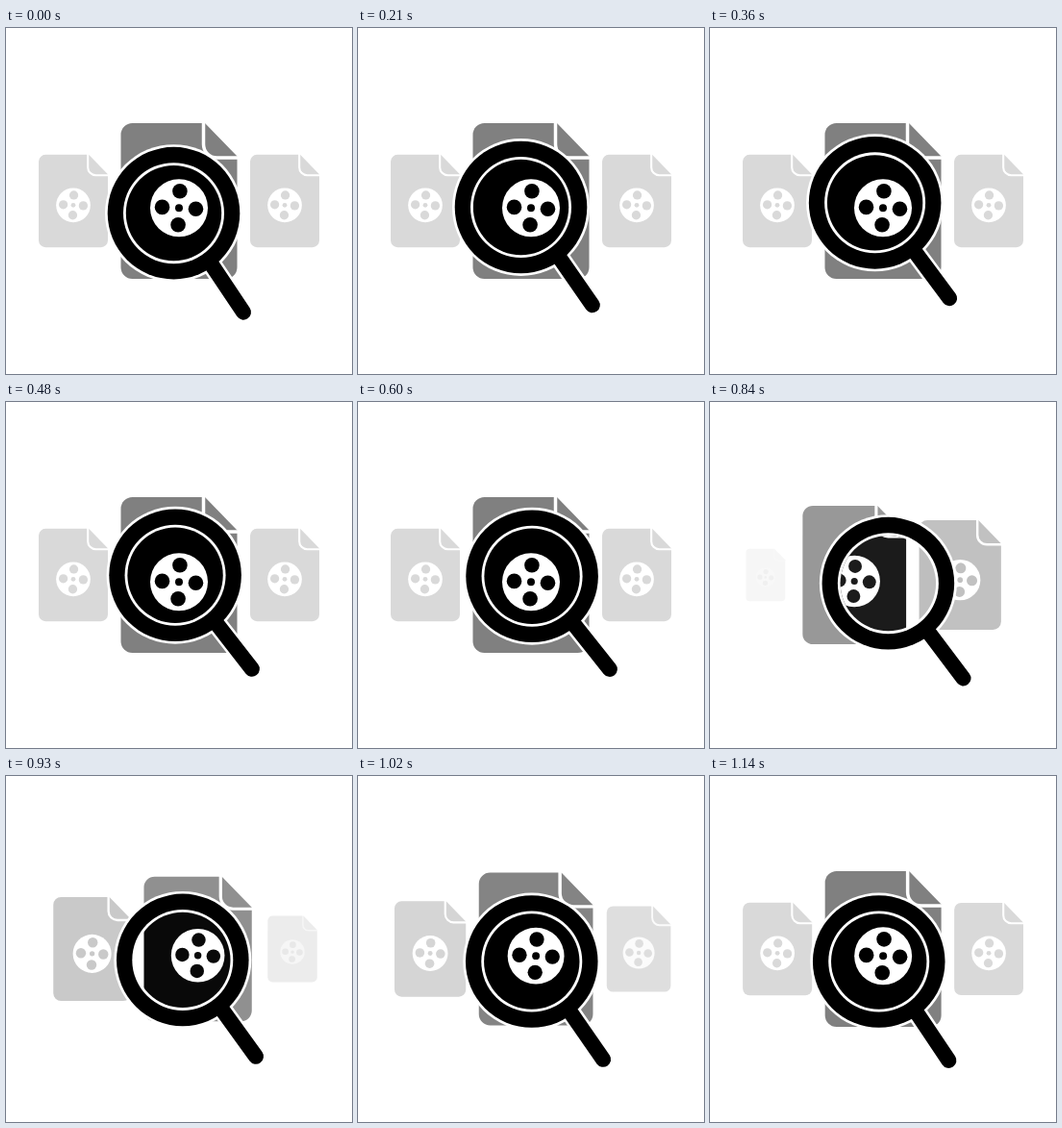
Animation of 360x360 px, one loop 1.17 s. Source, as an HTML page with a canvas:

```html
<!DOCTYPE html>
<html lang="en">
<head>
<meta charset="utf-8">
<title>File search</title>
<style>
  html, body { margin: 0; width: 100%; height: 100%; overflow: hidden; background: #fff; }
  canvas { display: block; width: 360px; height: 360px; }
</style>
</head>
<body>
<canvas id="stage" width="360" height="360"></canvas>
<script>
const ctx = document.getElementById('stage').getContext('2d');
const LOOP = 1170, STEP = 30, SLIDE_START = 600;
const TAU = Math.PI * 2, RAD = Math.PI / 180;

const page = new Path2D(
  'M-48.5-81H27L60.5-46.5V69A12 12 0 0 1 48.5 81H-48.5A12 12 0 0 1-60.5 69V-69A12 12 0 0 1-48.5-81Z');
const fold = new Path2D('M25.5-83V-59A14 14 0 0 0 39.5-45H63');

function disc(x, y, r, color) {
  ctx.fillStyle = color;
  ctx.beginPath();
  ctx.arc(x, y, r, 0, TAU);
  ctx.fill();
}

// Same curve as cubic-bezier(.78, 0, .15, 1)
function ease(u) {
  if (u <= 0) return 0;
  let lo = 0, hi = 1;
  for (let i = 0; i < 24; i++) {
    const s = (lo + hi) / 2, r = 1 - s;
    const x = 3 * s * r * r * 0.78 + 3 * s * s * r * 0.15 + s * s * s;
    if (x < u) lo = s; else hi = s;
  }
  return lo * lo * (3 - 2 * lo);
}

const smoother = d => d * d * d * (10 + d * (6 * d - 15));

// slot: 0 is the middle, -1 and 1 the sides; beyond that the file shrinks and fades
function drawFile(slot, inLens) {
  const dist = Math.min(Math.abs(slot), 1);
  const beyond = Math.abs(slot) - dist;
  const alpha = 1 - 2.8 * beyond;
  if (alpha <= 0) return;

  const scale = (1 - 0.405 * dist) * (1 - 1.6 * beyond);
  const level = Math.round(inLens ? 217 * smoother(dist) : 128 + 89 * dist);
  const color = `rgb(${level},${level},${level})`;

  ctx.save();
  ctx.globalAlpha = alpha;
  ctx.translate(180 + Math.sign(slot) * (110 * dist + 45 * beyond), 180);
  ctx.scale(scale, scale);
  ctx.fillStyle = color;
  ctx.fill(page);
  ctx.strokeStyle = '#fff';
  ctx.lineWidth = 3.5;
  ctx.stroke(fold);

  disc(0, 7.3, 30, '#fff');
  disc(0, 7.3, 4, color);
  for (let i = 0; i < 4; i++) {
    const a = (i * 90 + 3) * RAD;
    disc(17.5 * Math.cos(a), 7.3 + 17.5 * Math.sin(a), 7.8, color);
  }
  ctx.restore();
}

function drawFiles(shift, inLens) {
  for (let i = -1; i <= 2; i++) drawFile(i - shift, inLens);
}

function drawHandle(tilt, width, color) {
  const a = (tilt - 1.5) * RAD, b = tilt * RAD;
  ctx.strokeStyle = color;
  ctx.lineWidth = width;
  ctx.lineCap = 'round';
  ctx.beginPath();
  ctx.moveTo(60 * Math.cos(a), 60 * Math.sin(a));
  ctx.lineTo(126 * Math.cos(b), 126 * Math.sin(b));
  ctx.stroke();
}

function draw(t) {
  const turn = TAU * t / LOOP;
  const shift = ease((t - SLIDE_START) / (LOOP - SLIDE_START));
  const x = 177.5 + 8 * Math.cos(turn + 112 * RAD);
  const y = 186.8 + 6.6 * Math.sin(turn + 118 * RAD);
  const tilt = 52.5 + 2.4 * Math.cos(turn - TAU * 30 / LOOP);

  ctx.fillStyle = '#fff';
  ctx.fillRect(0, 0, 360, 360);
  drawFiles(shift, false);

  ctx.save();
  ctx.translate(x, y);
  drawHandle(tilt, 21, '#fff');
  disc(0, 0, 71.5, '#fff');
  drawHandle(tilt, 16, '#000');
  disc(0, 0, 68.8, '#000');
  disc(0, 0, 52.5, '#fff');
  ctx.restore();

  ctx.save();
  ctx.beginPath();
  ctx.arc(x, y, 49.7, 0, TAU);
  ctx.clip();
  drawFiles(shift, true);
  ctx.restore();
}

const start = performance.now();
function tick() {
  const t = (performance.now() - start) % LOOP;
  draw(Math.floor(t / STEP) * STEP);
  requestAnimationFrame(tick);
}
tick();
</script>
</body>
</html>
```
